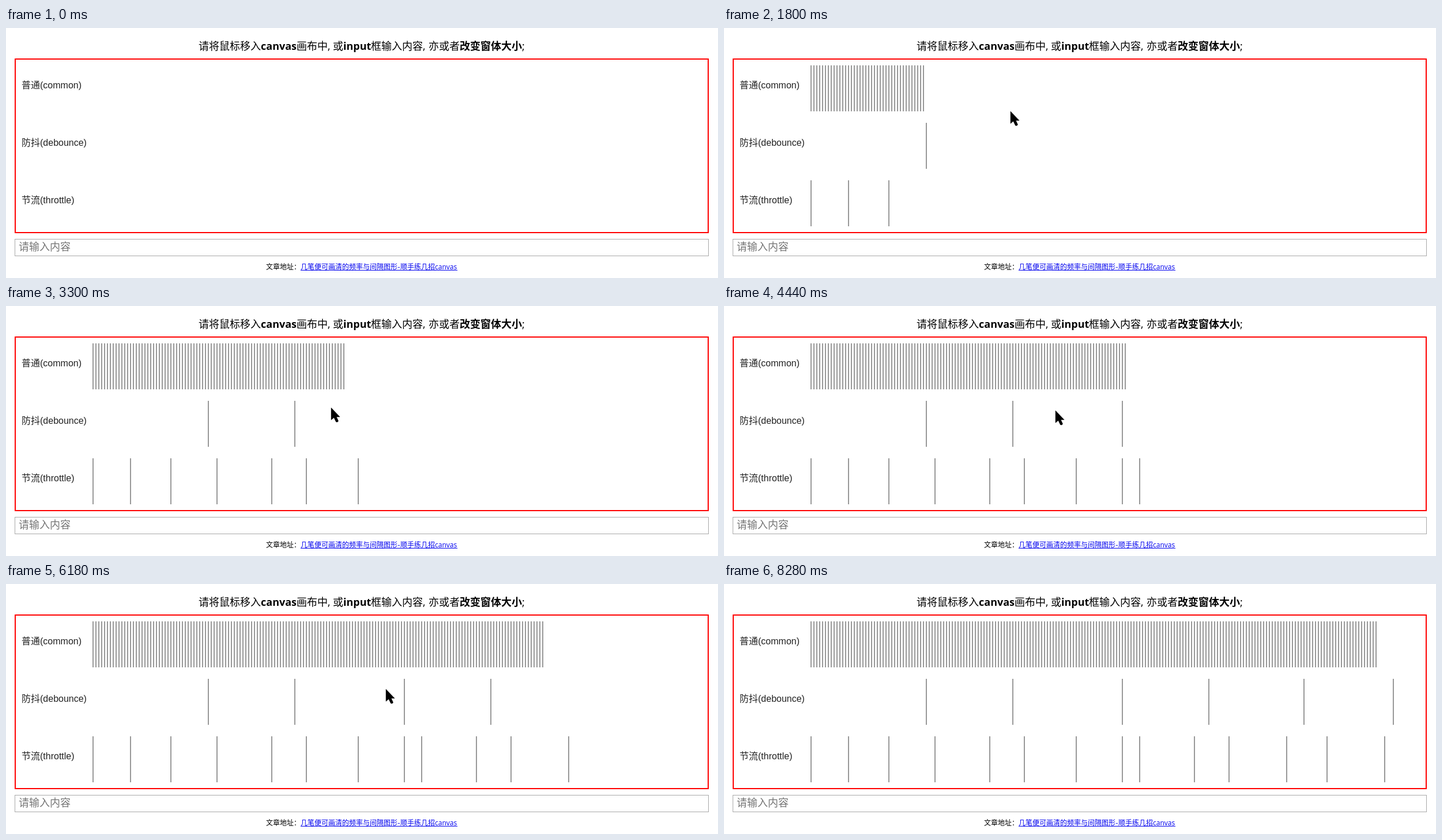
Write an HTML page that moves like this. It is 1235x435 px and loops after 8.64 s.

```html
<!DOCTYPE html>
<html lang="zh-CN">
<head>
<meta charset="utf-8">
<title>防抖与节流</title>
<style>
  html, body { margin: 0; width: 100%; height: 100%; overflow: hidden; background: #fff; }
  svg { display: block; width: 1235px; height: 435px; }
  text { white-space: pre; }
  .ui { font-family: "Open Sans", "Noto Sans CJK SC", "Noto Sans CJK", sans-serif; }
  .label { font: 16px "Liberation Sans", "Noto Sans CJK SC", "Noto Sans CJK", sans-serif; fill: #222; }
  .title, .hint { font-size: 18px; }
  .foot { font-size: 12px; }
  .b { font-weight: bold; }
</style>
</head>
<body>
<svg viewBox="0 0 1235 435" xmlns="http://www.w3.org/2000/svg">
  <rect width="1235" height="435" fill="#fff"/>
  <text class="ui title" y="38"><tspan x="334">请将鼠标移入</tspan><tspan class="b" x="442">canvas</tspan><tspan x="504">画布中,</tspan><tspan x="567">或</tspan><tspan class="b" x="585">input</tspan><tspan x="633">框输入内容,</tspan><tspan x="733">亦或者</tspan><tspan class="b" x="787">改变窗体大小</tspan><tspan x="895">;</tspan></text>
  <rect x="16" y="54" width="1202" height="302" fill="none" stroke="#f00" stroke-width="2"/>
  <g class="label">
    <text x="27" y="105">普通(common)</text>
    <text x="27" y="205">防抖(debounce)</text>
    <text x="27" y="305">节流(throttle)</text>
  </g>
  <rect x="15.5" y="367.5" width="1203" height="29" fill="none" stroke="#a9a9a9"/>
  <text class="ui hint" x="22" y="387" fill="#757575">请输入内容</text>
  <text class="ui foot" x="451" y="420">文章地址：</text>
  <text class="ui foot" y="420" fill="#00e"><tspan x="511">几笔便可画清的频率与间隔图形</tspan><tspan x="679.5">-</tspan><tspan x="684">顺手练几招</tspan><tspan x="744">canvas</tspan></text>
  <rect x="511" y="421" width="272" height="1" fill="#00e"/>
  <path id="bars" fill="#999" shape-rendering="crispEdges"/>
  <path id="cursor" d="M0 0V21.3L4.8 17.2L8.2 24.2Q9 25.4 10.6 24.9Q13 24 12.3 22.4L9.3 16H15.2Z" stroke="#000" stroke-width=".4"/>
</svg>
<script>
const LOOP = 8640, STEP = 60, WAIT = 300;
const FIRST = 150, GAP = 5;
const bars = document.getElementById('bars');
const cursor = document.getElementById('cursor');

// Mouse movements: time span, last common bar, where the pointer comes to rest.
const moves = [
  { from: 60, to: 540, bar: 205, x: 539, y: 150 },
  { from: 660, to: 1260, bar: 345, x: 497, y: 145 },
  { from: 1800, to: 2340, bar: 490, x: 560, y: 172 },
  { from: 2940, to: 3720, bar: 675, x: 569, y: 183 },
  { from: 4380, to: 4920, bar: 820, x: 621, y: 170 },
  { from: 5820, to: 6360, bar: 980, x: 678, y: 189 },
  { from: 7320, to: 7920, bar: 1130, x: 533, y: 133 }
];
const entry = { bar: FIRST - GAP, x: 1080, y: 19 };
const leave = { from: 7920, to: 8220, x: 1215, y: 7 };

// A pause longer than WAIT fires one debounced call, which takes a slot of its own.
const debounced = moves
  .filter((m, i) => !moves[i + 1] || moves[i + 1].from - m.to > WAIT)
  .map((m, i) => ({ time: m.to + WAIT, x: m.bar + GAP * (i + 1) }));

const throttled = [150, 215, 285, 365, 460, 520, 610, 690, 720, 815, 875, 975, 1045, 1145];
const LEAD = 12.5; // how far throttled calls run ahead per debounced call

// Follows a property through the legs, holding it between them.
function follow(legs, key, t, power = 1) {
  let value = entry[key];
  for (const leg of legs) {
    const p = Math.min(1, Math.max(0, (t - leg.from) / (leg.to - leg.from)));
    value += (leg[key] - value) * p ** power;
  }
  return value;
}

const bar = (x, y) => `M${x} ${y}h2v80h-2z`;

function draw(time) {
  const t = Math.floor(time / STEP) * STEP;
  const last = GAP * Math.round(follow(moves, 'bar', t, 0.88) / GAP);
  const fired = debounced.filter(c => c.time <= t);
  let d = '';
  for (let x = FIRST; x <= last; x += GAP) d += bar(x, 65);
  for (const c of fired) d += bar(c.x, 165);
  for (const x of throttled) if (x <= last + LEAD * fired.length) d += bar(x, 265);
  bars.setAttribute('d', d);

  const path = [...moves, leave];
  const x = Math.round(follow(path, 'x', t)), y = Math.round(follow(path, 'y', t));
  cursor.setAttribute('transform', `translate(${x} ${y})`);
  const shown = t >= moves[0].from && t <= leave.to;
  cursor.setAttribute('visibility', shown ? 'visible' : 'hidden');
}

const start = performance.now();
function tick() {
  draw((performance.now() - start) % LOOP);
  requestAnimationFrame(tick);
}
tick();
</script>
</body>
</html>
```
